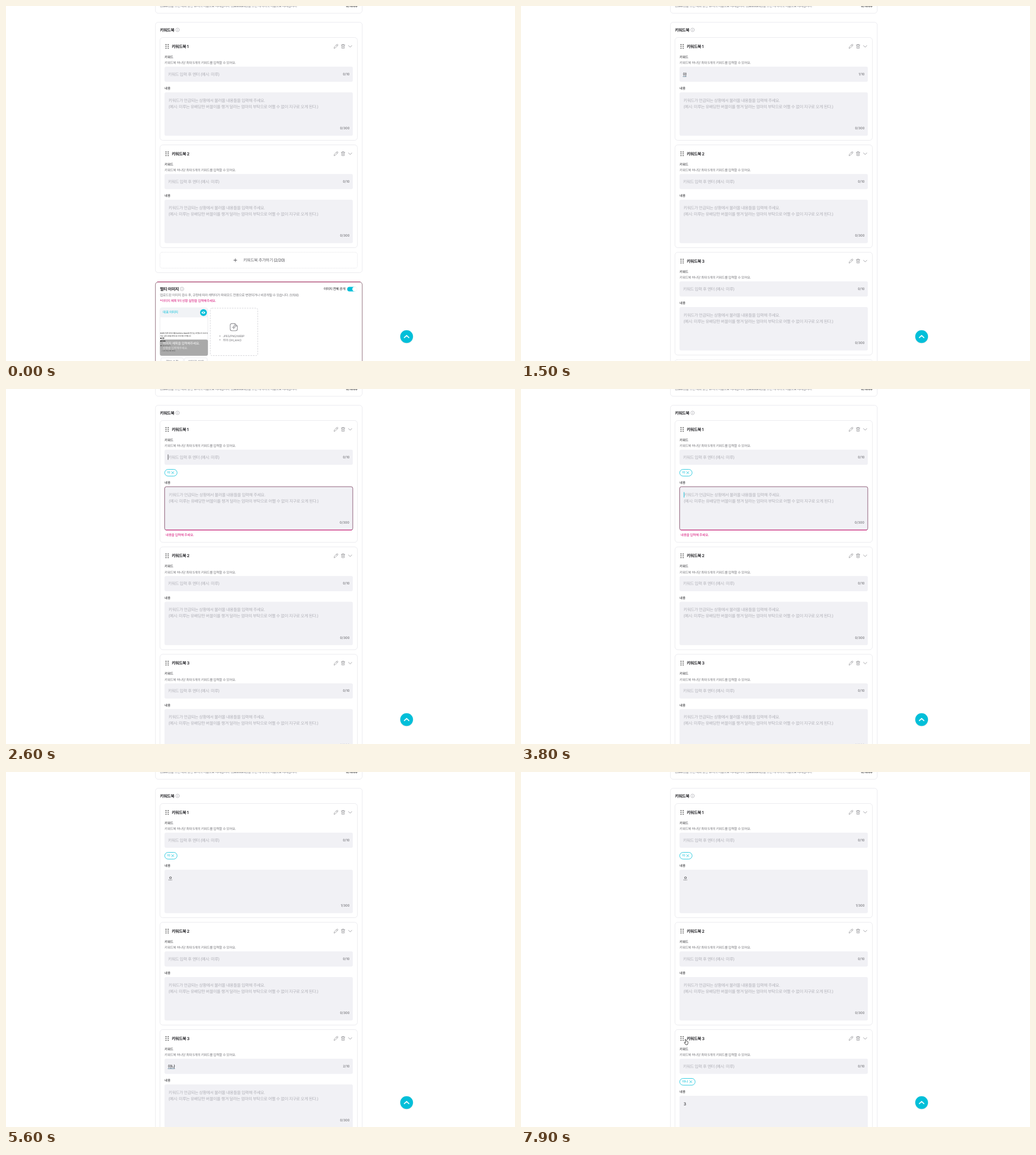
Recreate the animation shown at these times as an HTML page. Size 897x625 px, loop 8000 ms.

```html
<!DOCTYPE html>
<html lang="ko">
<head>
<meta charset="utf-8">
<style>
html, body { margin: 0; width: 100%; height: 100%; overflow: hidden; background: #fff; }
svg { display: block; width: 897px; height: 625px; }
text {
  font-family: Inter, "Noto Sans CJK KR", "Noto Sans CJK", sans-serif;
  letter-spacing: -.055em; text-rendering: geometricPrecision; white-space: pre;
}
.num { letter-spacing: 0; }
</style>
</head>
<body>
<svg id="stage" viewBox="0 0 897 625"></svg>
<script>
const stage = document.getElementById('stage');
const LOOP = 8000, STEP = 100;
const TEAL = '#00bfd9', PINK = '#d6157a', INK = '#1c1c20', GRAY = '#77777c', FAINT = '#b1b1b8', LINE = '#e6e6eb';
const BIG = 7.33, SMALL = 5.88;

// Scheduled hard changes: [time, value]
const keyword1 = [[0, ''], [1400, 'ㅇ'], [1500, '아'], [1800, '아ㄴ'], [1900, '아나'], [2100, '아'], [2200, 'ㅇ'], [2400, '아'], [2600, '']];
const keyword3 = [[0, ''], [4800, 'ㅇ'], [5000, '아나'], [5300, '아'], [5600, '아나'], [5800, '']];

// Pointer strokes: each is a list of [time, x, y, shape]; the last entry ends the stroke
const strokes = [
  [[100, 677, 545, 'arrow'], [200, 600, 500, 'arrow'], [300, 500, 456, 'arrow'], [400, 452, 448, 'hand'],
   [600, 445, 330, 'arrow'], [800, 397, 133, 'arrow'], [900, 281, 131, 'beam'], [1400, 281, 131, 'beam']],
  [[4200, 316, 545, 'arrow'], [4400, 329, 522, 'beam'], [4500, 330, 520, 'beam'], [4800, 330, 520, 'beam']],
  [[6000, 331, 528, 'beam'], [6100, 352, 560, 'arrow'], [6200, 380, 596, 'beam'], [6300, 395, 614, 'beam'], [6800, 395, 614, 'beam']],
  [[7300, 359, 548, 'arrow'], [7500, 340, 520, 'arrow'], [7700, 288, 470, 'hand'], [8000, 288, 470, 'hand']]
];

const latest = (list, t) => list.filter(([at]) => at <= t).pop()[1];
const between = (t, from, to) => t >= from && t < to;

function text(x, middle, str, size = BIG, fill = INK, weight = 400, extra = '') {
  return `<text x="${x}" y="${middle + size * .36}" font-size="${size}" fill="${fill}" font-weight="${weight}" ${extra}>${str}</text>`;
}
const count = (x, middle, str, fill = GRAY, weight = 500) =>
  text(x, middle, str, 5.8, fill, weight, 'class="num" text-anchor="end"');
const box = (x, y, w, h, r, fill, stroke = 'none', extra = '') =>
  `<rect x="${x}" y="${y}" width="${w}" height="${h}" rx="${r}" fill="${fill}" stroke="${stroke}" ${extra}/>`;
const path = (d, stroke, width = .8, extra = '') =>
  `<path d="${d}" fill="none" stroke="${stroke}" stroke-width="${width}" stroke-linecap="round" stroke-linejoin="round" ${extra}/>`;
const dot = (x, y, r, fill) => `<circle cx="${x}" cy="${y}" r="${r}" fill="${fill}"/>`;
const at = (x, y, body) => `<g transform="translate(${x} ${y})">${body}</g>`;
const caret = (x, y, color) => box(x, y, .9, 9.5, 0, color);
const info = (x, y) => at(x, y, path('M3.2 0A3.2 3.2 0 1 1-3.2 0A3.2 3.2 0 1 1 3.2 0M0-.3V1.6M0-1.6V-1.5', '#a0a0a6', .6));

function cardHeader(title) {
  let out = '';
  for (const x of [282, 285.7]) for (const y of [12.4, 15.6, 18.8]) out += dot(x, y, .9, '#333');
  return out + text(292, 15.5, title, BIG, INK, 600)
    + at(581.5, 15.5, path('M-3.3 3.3L-2.8 1L1.7-3.4Q2.4-3.9 3.1-3.2Q3.8-2.5 3.3-1.8L-1.1 2.7ZM.7-2.4L2.3-.8', '#8b8b90', .7))
    + at(594, 15.5, path('M-3.2-2.3H3.2M-1.3-2.4V-3.5H1.3V-2.4M-2.5-2.2L-2.2 3.5H2.2L2.5-2.2M-.7-.6V1.8M.7-.6V1.8', '#8b8b90', .65))
    + path('M603.6 14.2L606.5 17L609.4 14.2', '#8b8b90', .8);
}

function chipTag(word) {
  const width = word.length > 1 ? 27.2 : 21.8, x = 279.7 + width - 7.7;
  return box(279.7, 86, width, 11.8, 5.9, '#fff', TEAL, 'stroke-width=".8"')
    + text(284, 91.8, word, SMALL, TEAL, 500)
    + path(`M${x - 2} 89.9l4 4m0-4l-4 4`, TEAL, .75);
}

const cardHeight = c => 181 + (c.chip ? 20 : 0) + (c.error ? 13.5 : 0);

// Coordinates are relative to the top of the card
function card(c, number) {
  const shift = c.chip ? 20 : 0, top = 96.5 + shift, nudge = c.error ? .5 : 0;
  let out = box(271.3, 0, 348, cardHeight(c), 5, '#fff', LINE, 'stroke-width=".8"')
    + cardHeader('키워드북 ' + number)
    + text(279.3, 34.3, '키워드', SMALL, INK, 500)
    + text(279.3, 44.4, '키워드북 하나당 최대 5개의 키워드를 입력할 수 있어요.', SMALL, GRAY)
    + box(279.3, 51.3, 332, 26.7, 3, '#f1f1f5')
    + count(605.6, 64, c.word.length + '/10');
  out += c.word
    ? text(285.2, 64.4, c.word) + box(285.2, 68.2, 6.2 * c.word.length, .8, 0, '#35607c')
    : text(285.4, 64.4, '키워드 입력 후 엔터 (예시: 미루)', BIG, FAINT);
  if (c.wordCaret) out += caret(285.2, 59.7, '#55555a');
  if (c.chip) out += chipTag(c.chip);

  out += text(279.3, 89.6 + shift, '내용', SMALL, INK, 500)
    + box(279.3, top, 332, 76.5, 3, '#f1f1f5');
  if (c.error) {
    out += box(279.6, top, 331.5, 76.3, 3, 'none', '#84506c', 'stroke-width=".9"')
      + path(`M282 ${c.pinkTop ? top : top + 76.3}H609`, PINK, 1)
      + text(281.3, top + 84.6, '내용을 입력해 주세요.', SMALL, PINK, 500);
  }
  if (c.body) {
    out += text(286.5, top + 14.3, c.body);
    if (c.underline) out += path(`M286.7 ${top + 18}h5.6`, '#333', .8, c.underline === 'dotted' ? 'stroke-dasharray=".1 1.3"' : '');
  } else {
    out += text(286.3 + nudge, top + 14.3, '키워드가 언급되는 상황에서 불러올 내용들을 입력해 주세요.', BIG, FAINT)
      + text(286.3 + nudge, top + 24.9, '(예시: 미루는 유배당한 버블이를 챙겨 달라는 엄마의 부탁으로 어쩔 수 없이 지구로 오게 된다.)', BIG, FAINT);
  }
  if (c.bodyCaret) out += caret(c.body ? 291.3 : 286.8, top + 9.6, TEAL);
  return out + count(605.6 - nudge, top + 63.2, c.body.length + '/300');
}

// Coordinates are relative to the top of the section
function imageSection() {
  const tile = box(271.3, 45.5, 84.5, 84.5, 4, '#fff', '#e3e3e8', 'stroke-width=".7"')
    + box(271.3, 45.5, 84.5, 17, 3, '#f1f3f6')
    + text(276.3, 53, '대표 이미지', SMALL, TEAL, 500)
    + dot(348, 54, 6, TEAL)
    + path('M344.8 54Q348 50.3 351.2 54Q348 57.7 344.8 54Z', '#fff', .6, 'style="fill:#fff"') + dot(348, 54, 1.1, TEAL)
    + text(271.5, 90, '2025년 입력 예시(이름) function a (base)로 만든 글, 초안입니다 (노트 1)', 2.95, '#222', 500)
    + text(271.5, 94.7, '기본, 설정 내용을 바탕으로 이야기를 시작합니다', 2.95, '#222', 500)
    + text(271.5, 99.2, '●내용', 2.95, '#222', 600)
    + box(271.3, 101.5, 84.5, 28.5, 3, '#a9a9a9')
    + text(271.7, 104.4, '●TION', 3, '#222', 700)
    + text(271.7, 112, '●사용 안내 문서', 2.8, '#555')
    + text(274, 121, '• 노트 작성, 예시 안내', 2.8, '#444')
    + text(276.3, 108, '이미지 제목을 입력해주세요.', SMALL, '#fff', 500)
    + text(276.3, 116, '상황을 입력해주세요.', 5.3, '#e4e4e4');
  const upload = box(360, 46.2, 83.7, 83.5, 3, '#fff', '#c9c9ce', 'stroke-width=".8" stroke-dasharray="2.6 1.8"')
    + at(401.4, 79.6, path('M2-6.3H-3.3Q-6.3-6.3-6.3-3.3V3.3Q-6.3 6.3-3.3 6.3H3.3Q6.3 6.3 6.3 3.3V-2ZV-2H6.3M0-2.5V3M-2.8 .3H2.8', '#929297', 1.1))
    + dot(377, 95.3, .8, GRAY) + text(382.3, 95.3, 'JPEG/PNG/WEBP', 5, GRAY)
    + dot(377, 102, .8, GRAY) + text(382.3, 102, '최대 {{int_size}}', 5, GRAY);
  return box(263.3, 0, 364.5, 180, 5, '#fff', '#76505f', 'stroke-width=".8"')
    + path('M267 0H624', '#b82d68', .9)
    + text(271.2, 12.4, '멀티 이미지', BIG, INK, 600) + info(310.2, 12.3)
    + text(559.7, 12, '이미지 전체 공개', SMALL, INK, 500)
    + box(601.3, 8.6, 16.5, 8, 4, TEAL) + dot(614.5, 12.6, 4.2, '#fff') + path('M614.5 8.4A4.2 4.2 0 0 1 614.5 16.8', '#ededf0', .5)
    + text(271.2, 23.3, '업로드된 이미지 검수 후, 규정에 따라 캐릭터가 파워모드 전용으로 변경되거나 비공개될 수 있습니다. (1/100)', SMALL, GRAY)
    + text(271.2, 33.4, '*이미지 제목 1의 상황 설정을 입력해주세요.', SMALL, PINK, 500)
    + tile + upload
    + box(273, 133.7, 39.5, 14, 2.5, '#fff', LINE, 'stroke-width=".8"') + text(282, 139.6, '정보 수정', SMALL, GRAY)
    + box(314.5, 133.7, 40, 14, 2.5, '#fff', LINE, 'stroke-width=".8"') + text(321, 139.6, '이미지 삭제', SMALL, GRAY);
}

const shapes = {
  arrow: '<path d="M0 0V8.2L1.9 6.5L3.2 9.4L4.6 8.8L3.3 6H5.8Z" fill="#111" stroke="#fff" stroke-width=".6"/>',
  beam: path('M-1.8-4Q0-4 0-3V3Q0 4-1.8 4M1.8-4Q0-4 0-3V3Q0 4 1.8 4M-.9 .8H.9', '#222', .9),
  hand: '<path d="M1.2 1Q2.2 0 2.9 1.2L3.6 4Q4.5 3.4 5 4.2Q6 4 6.2 5L6.3 7.5L5.3 10H2.2L-.2 6.6Q0 5.5 1 6L2 6.8Z" fill="#fff" stroke="#222" stroke-width=".8" stroke-linejoin="round"/>'
};

function pointer(t) {
  const stroke = strokes.find(s => between(t, s[0][0], s[s.length - 1][0]));
  if (!stroke) return '';
  const i = stroke.findIndex(p => p[0] > t);
  const [t0, x0, y0, shape] = stroke[i - 1], [t1, x1, y1] = stroke[i];
  const k = (t - t0) / (t1 - t0);
  return at(x0 + (x1 - x0) * k, y0 + (y1 - y0) * k, shapes[shape]);
}

function render(t) {
  const cards = [
    { word: latest(keyword1, t), body: t >= 4100 ? 'ㅇ' : '', chip: t >= 2600 && '아', error: between(t, 2600, 4100),
      underline: t < 4500 ? 'solid' : 'dotted',
      wordCaret: between(t, 1000, 1300) || between(t, 2600, 2900), bodyCaret: between(t, 3300, 4100) },
    { word: '', body: '' }
  ];
  if (t >= 500) cards.push({
    word: latest(keyword3, t), body: t >= 6800 ? '3' : '', chip: t >= 5800 && '아나', error: between(t, 5800, 6800), pinkTop: true,
    wordCaret: between(t, 4500, 4800) || between(t, 5800, 6000),
    bodyCaret: between(t, 6300, 7300) || between(t, 7600, 7900)
  });

  let y = 55.5, list = '';
  cards.forEach((c, i) => {
    list += at(0, y, card(c, i + 1));
    y += cardHeight(c) + 8;
  });

  stage.innerHTML =
    box(263.3, -40, 364.5, 52.8, 5, '#fff', LINE, 'stroke-width=".8"')
    + text(271.2, .3, '{{user}}을 쓰면 대화 중인 유저의 이름으로 대체됩니다. {{assistant}}를 쓰면 캐릭터의 이름으로 대체됩니다.', 5.8, GRAY)
    + count(619.3, .3, '0/1000', '#333', 600)
    + box(263.3, 28.6, 364.5, y + 36 - 28.6, 5, '#fff', LINE, 'stroke-width=".8"')
    + text(271.2, 42.2, '키워드북', BIG, INK, 600) + info(302.4, 42)
    + list
    + box(271.3, y, 348, 28, 4, '#fff', '#dedee3', 'stroke-width=".7" stroke-dasharray="1.5 1"')
    + path(`M401.4 ${y + 14}h5.4m-2.7-2.7v5.4`, '#55555a', .9)
    + text(418, y + 14, `키워드북 추가하기 (${cards.length}/20)`, BIG, '#66666b', 500)
    + at(0, y + 52.3, imageSection())
    + '<circle cx="706" cy="582.6" r="11.8" fill="#000" opacity=".08"/>'
    + dot(706, 582, 11.2, TEAL) + path('M702 583.8L706 580L710 583.8', '#fff', 1.7)
    + pointer(t);
}

let shown = -1;
function tick() {
  const t = Math.floor(performance.now() % LOOP / STEP) * STEP;
  if (t !== shown) render(shown = t);
  requestAnimationFrame(tick);
}
tick();
</script>
</body>
</html>
```
